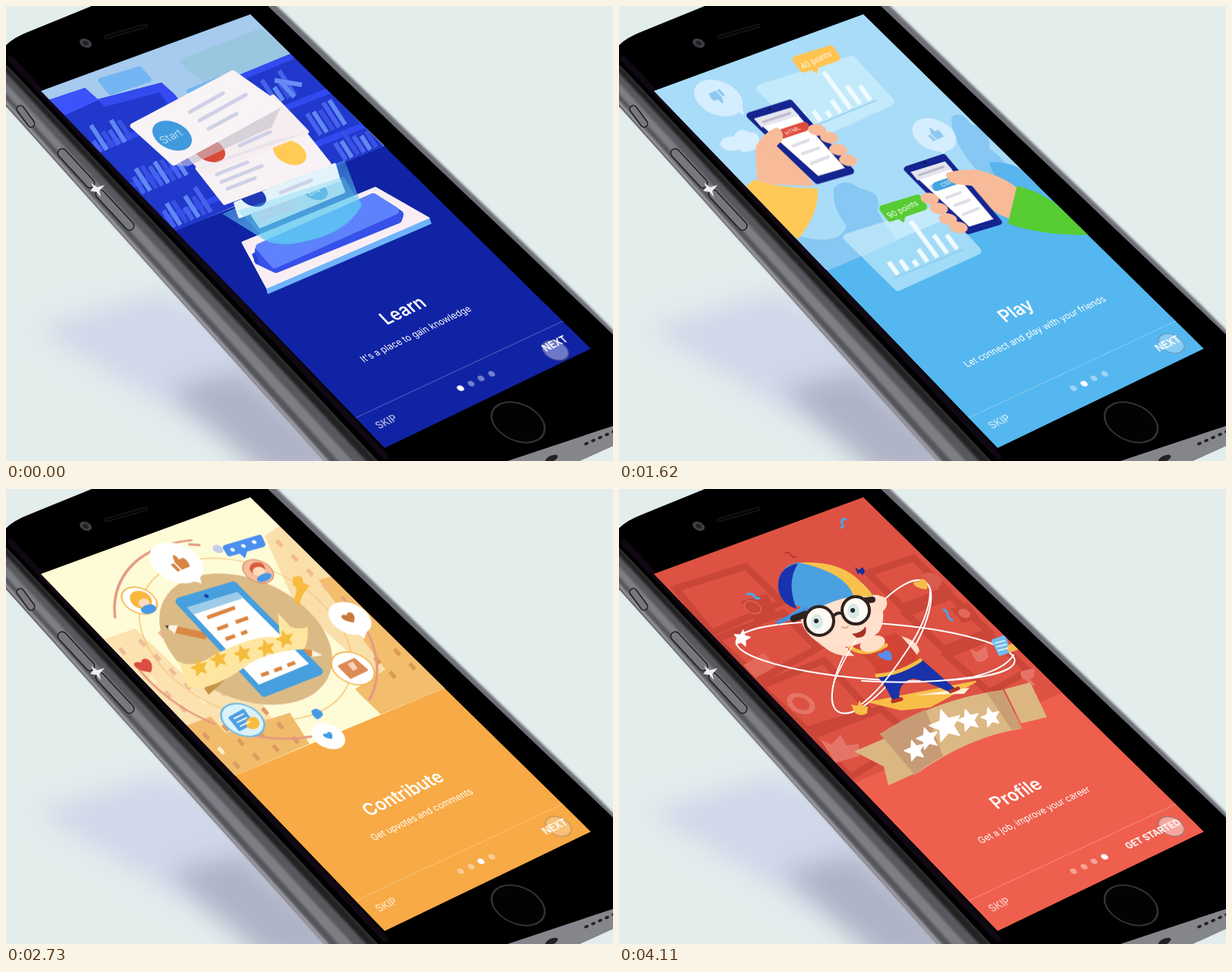
An HTML page for the animation above (4.14 s loop, 800x600 px).

```html
<!DOCTYPE html>
<html lang="en">
<head>
<meta charset="utf-8">
<title>Onboarding</title>
<style>
html, body { margin: 0; width: 100%; height: 100%; overflow: hidden; background: #e3edec; }
svg { display: block; width: 800px; height: 600px; }
text { font-family: Inter, Roboto, sans-serif; fill: #fff; }
</style>
</head>
<body>
<svg id="stage" viewBox="0 0 800 600"></svg>
<script>
const LOOP = 4140;
const SCREEN = '46,112 322,11 771,452 499,583';

// Shape helpers; "plane" maps local units onto the tilted screen
const plane = (x, y, s = 1) => `matrix(${.735 * s} ${-.32 * s} ${.68 * s} ${.69 * s} ${x} ${y})`;
const poly = (pts, fill, round = 0, more = '') =>
  `<polygon points="${pts}" fill="${fill}" stroke="${fill}" stroke-width="${round}" stroke-linejoin="round" ${more}/>`;
const line = (x, y, x2, y2, color, w = 4, cap = 'round') =>
  `<path d="M${x} ${y}L${x2} ${y2}" stroke="${color}" stroke-width="${w}" stroke-linecap="${cap}"/>`;
const path = (d, fill, more = '') => `<path d="${d}" fill="${fill}" ${more}/>`;
const curve = (d, color, w, more = '') => path(d, 'none', `stroke="${color}" stroke-width="${w}" stroke-linecap="round" ${more}`);
const oval = (x, y, rx, ry, fill, rot = 0, more = '') =>
  `<ellipse rx="${rx}" ry="${ry}" fill="${fill}" transform="translate(${x} ${y}) rotate(${rot})" ${more}/>`;
const disc = (x, y, r, fill, more = '') => `<circle r="${r}" fill="${fill}" transform="${plane(x, y)}" ${more}/>`;
const group = (id, inner, more = '') => `<g id="${id}" ${more}>${inner}</g>`;
const at = (x, y, s, inner) => `<g transform="${plane(x, y, s)}">${inner}</g>`;
const label = (x, y, size, str, anchor = 'middle', more = '') =>
  `<text transform="matrix(.725 -.349 .66 .7 ${x} ${y})" font-size="${size}" text-anchor="${anchor}" ${more}>${str}</text>`;
const heart = (x, y, s, fill) => at(x, y, s, path('M0 9C-20-4-8-16 0-7C8-16 20-4 0 9Z', fill));
const thumb = (x, y, s, fill, turn = 0) => at(x, y, s,
  path('M-11-2h5v12h-5zM-4-2L1-12Q6-12 4-4H11Q13 3 9 10H-4Z', fill, `transform="rotate(${turn})"`));
const star = (x, y, r, fill, rot = -18) => {
  const pts = [...Array(10)].map((_, i) => {
    const a = (i * 36 - 90 + rot) * Math.PI / 180, q = i % 2 ? r * .45 : r;
    return `${(x + q * Math.cos(a)).toFixed(1)},${(y + q * Math.sin(a)).toFixed(1)}`;
  });
  return poly(pts.join(' '), fill, 1.5);
};
let seed = 7;
const rand = () => (seed = (seed * 16807) % 2147483647) / 2147483647;

// Phone body
function strip(a, b, color) {
  const top = k => 76 + 52 * k, foot = k => 490 - 70 * k;
  return poly(`-2,${top(a)} -2,${top(b)} ${foot(b)},602 ${foot(a)},602`, color);
}
function body() {
  const button = (x, y, x2, y2, w) => line(x, y, x2, y2, '#1c1c20', w + 3) + line(x, y, x2, y2, '#77777d', w);
  let s = '<g filter="url(#soft)">' +
    poly('40,425 200,378 330,425 560,630 380,630', '#ccd3ea', 0, 'opacity=".8"') +
    poly('215,505 310,480 470,610 350,630', '#9a9cb0', 0, 'opacity=".6"') + '</g>';
  s += poly('330,-5 350,-5 762,391 805,434 805,470 700,400', '#6e6f78', 3, 'filter="url(#edge)"');
  s += path('M805 548L640 602H752L805 578Z', '#85858c');
  for (let i = 0; i < 5; i++) s += oval(765 + i * 9, 577 - i * 4, 3, 2, '#222', -25);
  s += oval(719, 597, 9, 4, '#222', -25);
  s += path('M-2 54L-2 130L421 602H505Z', '#3a3a3e');
  s += '<g filter="url(#edge)">' + strip(0, .2, '#202024') + strip(.2, .45, '#58585e') +
    strip(.45, .72, '#7e7e85') + strip(.72, .9, '#55555b') + strip(.9, 1, '#a0a0a6') + '</g>';
  s += path('M-2 54Q8 42 32 33L118-2H343L805 438V552L655 602H492L22 100Q2 78-2 76Z', '#000');
  s += curve('M6 70L500 594', '#150b17', 8, 'opacity=".8"');
  s += button(19, 136, 33, 155, 8) + button(74, 194, 111, 234, 10) + button(124, 248, 163, 290, 10);
  s += path('M112 233l8 6 10-3-7 8 2 8-6-7-8-1 4-5z', '#eee');
  s += disc(105, 49, 8, '#413f43') + disc(105, 49, 4, '#232126');
  s += line(132, 41, 184, 26, '#211a24', 5) + line(132, 41, 184, 26, '#050305', 3);
  s += disc(675, 549, 35, '#030303', 'stroke="#35313a" stroke-width="2.5"');
  return s;
}

// Library shelves with a stack of cards
function learnArt() {
  const books = (x, y, n) => {
    let s = '';
    for (let i = 0; i < n; i++) {
      const h = 18 + rand() * 22, c = ['#4762ec', '#6288f2', '#3a50e2'][i % 3];
      s += line(x + i * 8, y - i * 3.4, x + i * 8 - h * .55, y - i * 3.4 - h * .85, c, 6, 'butt');
    }
    return s;
  };
  const rule = (x, y, x2, y2) => line(x, y, x2, y2, '#cfd1e7', 5);
  let s = poly('40,114 325,8 500,184 222,297', '#a6cbee');
  s += poly('125,98 176,83 188,97 138,114', '#73b5f2', 7) + poly('233,73 335,33 371,63 265,101', '#99c7df', 7);
  s += poly('240,112 285,94 310,118 268,132', '#73b5f2', 5);
  s += poly('56,124 104,108 121,123 205,101 345,245 222,298', '#2038cc');
  s += poly('56,124 104,108 122,124 78,144', '#3c53fb') + poly('121,123 205,101 222,116 262,168 244,172 202,114 130,133', '#334af0');
  s += poly('300,97 378,64 498,185 370,236', '#2038cc') + line(305, 96, 378, 66, '#334af0', 8, 'butt');
  for (const [x, y, w] of [[113, 192, 110], [158, 240, 120], [200, 285, 100], [360, 138, 76], [395, 188, 80]])
    s += line(x, y, x + w, y - w * .4, '#304af0', 8, 'butt');
  s += books(125, 193, 6) + books(182, 247, 8) + books(222, 292, 7) + books(357, 128, 4) + books(415, 170, 5) + books(448, 203, 6);
  s += line(354, 98, 390, 104, '#6a8ef4', 6, 'butt') + line(360, 98, 380, 120, '#6288f2', 6, 'butt');
  s += poly('215,300 503,183 503,235 255,335', '#1023a5');
  s += poly('312,312 487,240 557,280 345,373', '#f8eef3', 3) + poly('343,373 558,280 561,287 345,380', '#6fb4fa');
  s += poly('334,322 484,253 518,275 516,281 356,346 333,335', '#3750e9', 12);
  s += poly('334,318 484,252 513,270 354,341', '#5d82fb', 10) + line(327, 328, 331, 338, '#2744d6', 5);
  let cards = poly('325,276 440,231 445,245 335,291', '#d4f0f8', 4, 'opacity=".85"') + disc(407, 243, 17, '#65b1e4') +
    label(408, 247, 11, 'End') + rule(337, 281, 382, 263) + rule(335, 274, 378, 256);
  cards += poly('302,260 433,209 439,230 308,278', '#e2f3fb', 4) + disc(325, 251, 18, '#2039b6') + rule(362, 246, 402, 230);
  cards += poly('252,214 391,164 426,208 288,260', '#f8f2f4', 5) + disc(374, 193, 22, '#ffcb55') +
    rule(278, 222, 318, 206) + rule(284, 232, 337, 211) + rule(292, 241, 328, 227);
  cards += poly('240,197 352,119 397,166 262,221', '#f6edf0', 5) + disc(268, 190, 21, '#d94a39') + rule(308, 184, 348, 166);
  cards += poly('252,216 397,167 350,178 275,206', '#d9d2dd', 0, 'opacity=".45"') + poly('222,210 363,132 350,160 240,211', '#c7c0cc', 0, 'opacity=".6"');
  cards += poly('167,158 299,88 360,131 221,207', '#f8f3f5', 7) + disc(219, 171, 26, '#3f9ade') +
    label(221, 176, 16, 'Start', 'middle', 'fill-opacity=".65"') + rule(242, 140, 286, 115) + rule(255, 151, 316, 117) + rule(267, 162, 304, 142);
  s += path('M285 274L446 203L469 263Q450 298 400 309Q360 320 340 308Z', 'url(#beam)');
  return s + group('cards', cards) + path('M305 270L445 225L468 264Q440 302 385 311Q355 314 340 305Z', '#62d2ef', 'opacity=".3"');
}

// Two hands playing against each other
function playArt() {
  const chart = (tag, str) => {
    let s = poly('303,304 424,266 475,322 370,370', '#d6f4fc', 10, 'opacity=".6"') + line(365, 358, 456, 320, '#8fcbee', 1.5);
    [22, 18, 10, 22, 64, 32, 25].forEach((h, i) => {
      const x = 370 + i * 13, y = 353 - i * 5.6;
      s += line(x, y, x - h * .55, y - h * .75, '#f0fbff', 6, 'butt');
    });
    return s + poly('350,266 396,252 404,264 360,279', tag, 9) + poly('368,278 380,275 378,285', tag) + label(379, 270, 12, str);
  };
  const handset = (pill, str) => poly('4,1 52,-15 125,71 85,83', '#15248f', 8) +
    poly('9,5 54,-9 118,67 86,77', '#fff') + poly('9,5 54,-9 63,1 18,16', '#e5e5ef') +
    line(20, 9, 52, -2, '#babacb', 3) + line(35, 24, 57, 15, '#dedee8') + line(56, 39, 74, 32, '#dedee8') +
    line(67, 49, 86, 42, '#dedee8') + line(78, 61, 98, 53, '#dedee8') + disc(28, -7, 2, '#0a155f') +
    line(43, 24, 69, 15, pill, 12) + label(57, 22, 8, str);
  const fingers = pts => pts.map(([x, y]) => oval(x, y, 12, 7.5, '#f8bb99', 8)).join('');
  let s = poly('40,114 325,8 548,232 272,348', '#a9dcf9');
  s += path('M283 240Q298 225 318 241Q349 245 340 270L366 310L275 349L225 300Q290 320 300 290Q280 265 283 240Z', '#86c8f3');
  s += path('M438 147Q452 136 463 156Q490 160 488 188Q514 205 530 240L440 278L470 215Q438 178 438 147Z', '#86c8f3');
  s += path('M488 206Q525 203 550 233L520 246Q492 228 488 206Z', '#58b5ee');
  const a = path('M131 184q2-13 18-11q7-14 20-6q14-1 14 12q8 8-7 11q-13 6-20 0q-16 5-25-6z', '#d7efff') +
    `<g transform="translate(-119 -195)">${chart('#ffc34f', '40 points')}</g>` +
    disc(129, 122, 32, '#d5eeff') + poly('150,137 160,131 163,145', '#d5eeff') + thumb(129, 120, .95, '#8fc8ed', 180) +
    path('M178 190Q181 174 207 162L255 238L180 235Z', '#f8bb99') +
    `<g transform="translate(166 144) scale(1.1 1.05)">${handset('#df4c3d', 'HTML')}</g>` +
    path('M178 186Q190 166 206 161Q217 166 213 178L203 188L210 200Z', '#f8bb99') + fingers([[259, 164], [275, 174], [287, 190], [300, 204]]) +
    path('M176 230Q215 242 260 241Q262 275 234 308L150 250Z', '#ffc957');
  const b = chart('#57cc33', '90 points') + disc(418, 169, 29, '#d5eeff') + poly('425,188 438,183 429,196', '#d5eeff') + thumb(418, 168, .9, '#8fc8ed') +
    path('M435 222L473 215Q505 226 530 241L519 280Q486 270 470 238Z', '#f8bb99') +
    `<g transform="translate(378 213)">${handset('#46a4e0', 'CSS')}</g>` +
    path('M434 219Q453 214 475 215Q514 225 531 243L518 278Q492 263 476 237L448 234Q432 230 434 219Z', '#f8bb99') +
    fingers([[412, 253], [424, 266], [436, 280], [450, 291]]) + path('M527 236Q575 247 625 301Q560 302 515 286Z', '#57cc33');
  return s + group('handA', a) + group('handB', b);
}

// Rotating wheel of contributions
function wheel() {
  let s = disc(316, 198, 138, 'none', 'stroke="#f6bd68" stroke-width="1.3"') + disc(316, 198, 112, '#dbba86');
  s += disc(316, 198, 170, 'none', 'stroke="#e59a80" stroke-width="3.5" stroke-linecap="round" stroke-dasharray="185 120 75 55 120 90 210 213" transform-origin="0 0"');
  s += line(222, 185, 265, 194, '#d98945', 9, 'butt') + poly('211,180 228,180 224,191', '#fff5e0') + poly('211,180 216,180 215,185', '#5a4030');
  s += line(385, 214, 405, 217, '#d98945', 8, 'butt') + poly('402,212 416,219 402,221', '#fff5e0');
  s += poly('230,149 300,128 411,240 340,268', '#479fdd', 10) + poly('240,157 305,137 398,230 333,257', '#fff') + poly('240,157 305,137 312,145 248,166', '#9dcbea');
  s += disc(265, 142, 3, '#1738a0');
  for (const [x, y, w] of [[266, 170, 36], [279, 185, 14], [303, 176, 16], [290, 198, 12], [310, 191, 8], [336, 245, 10], [353, 239, 10], [370, 232, 10]])
    s += line(x, y, x + w, y - w * .36, '#dc8540', 5, 'butt');
  s += path('M262 262L285 242L290 250L268 270Z', '#c79443') + path('M358 164L374 182Q390 187 396 181Q398 203 391 211Q350 213 322 229Q270 268 241 260L234 240L228 226Q247 238 276 218Q330 190 360 196Z', '#ffe6a0');
  [[256, 235], [281, 224], [312, 217], [343, 210], [367, 198]].forEach(([x, y]) => s += star(x, y, 11, '#f5bd3c'));
  s += path('M377 118Q392 112 390 124L399 129Q386 141 386 156L378 147Q386 130 377 128Z', '#f8bb40');
  s += disc(226, 99, 35, '#fff') + poly('240,120 255,112 259,126', '#fff') + thumb(229, 99, 1.1, '#d78540');
  s += disc(178, 148, 23, '#fff', 'stroke="#f3b448" stroke-width="2"') + oval(180, 147, 15, 11, '#f8b83e', 25) + oval(184, 151, 7, 6, '#ffdcbd') + oval(190, 159, 10, 6, '#4699e8', -10);
  s += disc(332, 110, 20, '#f5bd9a', 'stroke="#dd906c" stroke-width="1.5"') + oval(331, 106, 10, 8, '#dc5b40') + oval(333, 110, 8, 6, '#ffdcbd') + oval(340, 118, 10, 5, '#4699e8', -20);
  s += disc(280, 81, 7, '#c5cee8') + poly('290,79 334,66 338,75 295,87', '#4a90ee', 7) + poly('307,86 319,81 315,93', '#4a90ee');
  for (const i of [0, 1, 2]) s += disc(299 + i * 14, 82 - i * 5, 3, '#fff');
  s += disc(451, 171, 28, '#fff') + poly('459,188 475,184 469,198', '#fff') + heart(451, 171, .85, '#c9773b');
  s += disc(455, 236, 28, '#fff', 'stroke="#f3b448" stroke-width="2"') + poly('437,233 457,224 473,238 452,248', '#dd8a55', 3) + poly('448,230 455,227 461,236 455,239', '#f7d3b4');
  s += disc(312, 303, 28, '#dcf2fa', 'stroke="#66b7ea" stroke-width="2.5"') + poly('295,300 313,290 325,307 308,316', '#4e9fe2', 3) + oval(325, 307, 9, 8, '#f8bc40');
  for (const i of [0, 1, 2]) s += line(301 + i * 4, 301 + i * 5, 313 + i * 4, 295 + i * 5, '#fff', 1.8);
  s += disc(423, 324, 22, '#fff') + heart(424, 324, .6, '#459ce3') + path('M401 291Q407 285 414 292Q420 297 409 302Q402 299 401 291Z', '#459ce3');
  return s + heart(186, 234, 1.15, '#dc4d43') + line(243, 75, 256, 76, '#e59a80', 3);
}
function contributeArt() {
  let s = poly('40,114 325,8 582,261 302,378', '#fefbd7');
  s += poly('130,198 170,184 245,255 305,235 380,345 302,378', '#fbe2b0');
  s += poly('341,62 360,49 582,261 494,297 465,270 478,240 380,150', '#fbdfaa');
  s += poly('412,120 430,115 582,261 494,297 460,264 500,238', '#f2bd6c') + poly('235,313 270,300 290,322 374,295 400,336 302,378', '#f1bb6c');
  const panes = (x, y, cols, rows, c) => {
    for (let j = 0; j < rows; j++) for (let i = 0; i < cols; i++) {
      const px = x + i * 26 + j * 20, py = y - i * 11 + j * 19;
      s += line(px, py, px + 7, py + 8, rand() < .2 ? '#fdeec6' : c, 5, 'butt');
    }
  };
  panes(150, 210, 3, 5, '#f0bc9a'); panes(260, 322, 4, 3, '#dd9b61'); panes(357, 68, 2, 4, '#f0bc8a'); panes(486, 222, 2, 2, '#d99a55');
  return s + `<g transform="${plane(316, 198)}"><g id="wheel"><g transform="matrix(.967 .449 -.953 1.03 -116.9 -345.8)">${wheel()}</g></g></g>`;
}

// Trophy shelf and champion
function profileArt() {
  let s = poly('40,114 325,8 588,267 310,388', '#dd5243');
  const frame = (pts, fill = 'none') => `<polygon points="${pts}" fill="${fill}" stroke="#c94638" stroke-width="9"/>`;
  s += frame('75,131 167,102 215,149 122,190') + frame('128,198 216,163 262,210 185,252') + frame('186,260 270,226 330,292 248,318') + frame('253,326 345,290 388,328 305,380');
  s += frame('328,111 388,91 432,133 374,156') + frame('378,164 437,141 487,188 428,211') + frame('432,219 491,195 540,240 488,268');
  s += poly('160,148 196,138 206,162 180,174', '#c94638') + disc(176, 156, 11, 'none', 'stroke="#e2685a" stroke-width="1.5"');
  s += poly('164,232 191,216 206,234 180,249', '#e2685a') + disc(240, 283, 15, 'none', 'stroke="#e57467" stroke-width="7"');
  s += poly('266,331 280,337 292,324 300,338 316,336 317,352 285,361', '#e57467');
  s += poly('437,158 460,150 475,169 453,177', '#c94638') + disc(455, 164, 8, '#e2685a') + path('M462 211l10 4 12-8 3 14q-8 11-17 5z', '#e57467') + path('M529 241l18-5q3 12-5 15l7 7-8 3-4-9q-8-1-8-11z', '#e57467') + disc(412, 120, 13, '#d75d4e');
  let orbit = oval(338, 214, 184, 37, 'none', 4, 'stroke="#fff" stroke-width="2"') + oval(346, 208, 103, 37, 'none', -56, 'stroke="#fff" stroke-width="2"');
  let c = poly('331,281 470,254 410,287 372,291', '#f9be48', 2) + poly('390,272 462,262 455,270', '#fff0d5');
  c += path('M339 246Q370 242 398 224Q420 243 445 265L436 268Q404 253 388 250Q366 255 370 279L361 280Q351 257 339 246Z', '#1932a8') +
    line(361, 280, 372, 277, '#b83226', 5) + line(437, 267, 447, 263, '#b83226', 5);
  c += path('M297 207Q279 211 261 202L270 208Q285 222 310 220ZM372 194Q394 200 396 214L386 227L379 222L387 212Z', '#ffdec8');
  c += path('M301 208L365 190Q386 206 397 226Q370 246 340 246Q338 226 301 208Z', '#d24535') + curve('M340 246Q370 244 397 226M303 207Q322 224 352 206', '#f7bd46', 5);
  c += oval(334, 204, 17, 10, '#ffdec8', -18) + heart(353, 221, .9, '#5a8cf2');
  c += path('M238 164Q242 196 275 208Q314 213 342 189Q354 172 343 140L285 137Z', '#ffe1ce') + oval(344, 152, 9, 11, '#ffdec8', 20);
  c += path('M210 176Q225 165 240 156Q208 144 211 119Q218 96 242 97Q289 97 312 117Q331 132 335 142Q295 136 247 166Q228 174 210 176Z', '#4ba1df');
  c += path('M236 98Q207 104 210 132Q214 152 234 158Q220 123 236 98Z', '#1933b0') + path('M238 97Q292 94 318 122Q331 133 335 142L309 141Q300 111 238 97Z', '#f9c14b') + line(210, 176, 247, 158, '#3d92e0', 5);
  const lens = (x, y, r) => `<circle cx="${x}" cy="${y}" r="${r}" fill="#fffaf4" stroke="#30221f" stroke-width="4"/>` + oval(x - 3, y + 1, 8, 10, '#d7e9e6') + `<circle cx="${x - 4}" cy="${y}" r="3" fill="#2b2525"/>`;
  c += line(230, 171, 246, 165, '#30221f', 9) + line(324, 147, 334, 146, '#30221f', 8) + lens(264, 174, 19) + lens(312, 160, 18) + curve('M282 168Q289 161 295 165', '#30221f', 4);
  c += path('M307 191Q320 190 325 181Q328 197 313 196Z', '#a93127') + curve('M294 182Q299 185 302 181', '#dfa48e', 2);
  c += curve('M283 255Q300 217 313 199', '#fff', 1.6) + curve('M410 135Q410 170 374 221Q344 266 318 285', '#fff', 2) + curve('M320 253Q400 258 466 248Q508 238 520 219', '#fff', 2);
  c += star(162, 197, 11, '#fff', 10) + path('M306 284l8 2 3-7 4 7 7 1-1 9q-10 5-17-2z', '#f8bd48');
  c += poly('493,200 508,195 514,214 502,218', '#72bcec', 4) + line(516, 210, 522, 208, '#f6ba55', 10);
  for (const i of [0, 1, 2]) c += line(496 + i * 2, 203 + i * 5, 508 + i * 2, 200 + i * 5, '#eaf6fc', 1.8);
  const confetti = curve('M299 40q-7-1-5 5q3 5-1 6', '#4aa6ec', 3) + curve('M169 139q6-2 9 2q2 4 7 3', '#4aa6ec', 3) + curve('M428 159q5 2 5 7q1 5 6 7', '#4aa6ec', 3) +
    path('M311 103l5 4 5-4 3 5-3 6-4-4-2 3z', '#182b9c') + curve('M219 84q5-2 7 3q3 3 7 3', '#b83a36', 2) + heart(400, 127, .9, '#f8bd48');
  const ribbon = poly('310,346 350,329 390,375 355,391 349,366', '#dcb681') + poly('508,264 542,255 564,301 530,309', '#dcb681') +
    path('M344 323Q420 276 506 265L531 316Q462 326 390 377Z', '#dcb884') + path('M344 323Q374 303 404 291L427 352Q408 362 390 377Z', '#c69b75') + poly('485,269 506,265 531,316 517,317', '#c99e75') +
    star(390, 345, 14, '#fff') + star(407, 329, 15, '#fff') + star(431, 312, 22, '#fff') + star(461, 305, 15, '#fff') + star(490, 301, 13, '#fff');
  return s + group('hero', orbit + c) + group('ribbon', ribbon) + group('confetti', confetti);
}

const pages = [
  ['Learn', "It's a place to gain knowledge", learnArt, -7],
  ['Play', 'Let connect and play with your friends', playArt, 1],
  ['Contribute', 'Get upvotes and comments', contributeArt, 1],
  ['Profile', 'Get a job, improve your career', profileArt, 0]
];
const spots = [[599, 504], [613, 498], [626, 491], [640, 485]];

stage.innerHTML = `<defs>
  <clipPath id="screen"><polygon points="${SCREEN}"/></clipPath>
  <filter id="soft" x="-30%" y="-30%" width="160%" height="160%"><feGaussianBlur stdDeviation="16"/></filter>
  <filter id="edge"><feGaussianBlur stdDeviation="1.5"/></filter>
  <linearGradient id="beam" x1="0" y1="0" x2=".4" y2="1"><stop stop-color="#60c6ee" stop-opacity=".2"/><stop offset="1" stop-color="#5cc9f4" stop-opacity=".75"/></linearGradient>
</defs>` + body() + `<g clip-path="url(#screen)"><polygon id="ground" points="${SCREEN}" fill="#1023a5"/>` +
  pages.map((p, i) => group('art' + i, p[2]())).join('') +
  pages.map((p, i) => group('copy' + i,
    label(529, 408, 27, p[0], 'middle', 'font-weight="600"') + label(550 + p[3], 433 - p[3] * .4, 14, p[1]))).join('') +
  line(461, 543, 735, 415, 'rgba(255,255,255,.25)', 1.2) +
  spots.map(([x, y]) => disc(x, y, 4.6, '#fff', 'opacity=".42"')).join('') +
  spots.map(([x, y], i) => group('dot' + i, disc(x, y, 4.6, '#fff'))).join('') +
  label(492, 558, 15.5, 'SKIP', 'start', 'font-weight="600" opacity=".62"') +
  group('tap', disc(728, 445, 17, '#fff', 'fill-opacity=".6" stroke="#7b7b86" stroke-width="1.5"')) +
  group('next', label(742, 442, 15, 'NEXT', 'end', 'font-weight="700"')) +
  group('start', label(742, 442, 14, 'GET STARTED', 'end', 'font-weight="700"')) + '</g>';

// Motion: each step is [ms, value, easing]
const OUT = 'cubic-bezier(.1,.6,.3,1)', EASE = 'ease-in-out';
function move(id, prop, steps) {
  const all = [...steps];
  if (all[0][0] > 0) all.unshift([0, all[0][1]]);
  const last = all[all.length - 1];
  if (last[0] < LOOP) all.push([LOOP, last[1]]);
  document.getElementById(id).animate(
    all.map(([t, v, easing = 'linear']) => ({ offset: t / LOOP, [prop]: v, easing })),
    { duration: LOOP, iterations: Infinity });
}
const shift = (x, y) => `translate(${x}px,${y}px)`;
const swaps = [[150, 620], [1710, 2160], [2850, 3300]];

pages.forEach((_, i) => {
  const enter = swaps[i - 1], leave = swaps[i], slide = [], fade = [], art = [], dot = [];
  if (enter) {
    const [a, b] = enter, mid = (a + b) / 2;
    art.push([a, 0, EASE], [b, 1]);
    fade.push([mid, 0], [b, 1]);
    slide.push([a, shift(130, -62), OUT], [b, shift(0, 0)]);
    dot.push([mid - 60, 0], [mid + 60, 1]);
  }
  if (leave) {
    const [a, b] = leave, mid = (a + b) / 2;
    art.push([a, 1, EASE], [b, 0]);
    fade.push([a, 1], [mid, 0]);
    slide.push([a, shift(0, 0), EASE], [b, shift(-130, 62)]);
    dot.push([mid - 60, 1], [mid + 60, 0]);
  }
  move('art' + i, 'opacity', art);
  move('copy' + i, 'opacity', fade);
  move('copy' + i, 'transform', slide);
  move('dot' + i, 'opacity', dot);
});
move('ground', 'fill', [[150, '#1023a5', EASE], [620, '#43a8ec'], [930, '#43a8ec'], [1620, '#55b7ef'], [1710, '#55b7ef', EASE],
  [2160, '#f0a744'], [2250, '#f1a744'], [2730, '#f7aa45'], [2850, '#f7aa45', EASE], [3300, '#e95d48'], [3570, '#eb5e49'], [4110, '#ef5f4d']]);
move('cards', 'transform', [[0, shift(0, 0)], [620, shift(-4, -4)]]);
move('handA', 'transform', [[150, shift(-70, 26), OUT], [930, shift(0, 0)], [1620, shift(2, -.7)], [2160, shift(-30, 11)]]);
move('handB', 'transform', [[150, shift(70, -28), OUT], [930, shift(0, 0)], [1620, shift(-2.5, 1)], [2160, shift(30, -12)]]);
move('wheel', 'transform', [[1710, 'rotate(21deg)'], [2250, 'rotate(9.7deg)'], [2730, 'rotate(0deg)'], [3300, 'rotate(-11deg)']]);
move('hero', 'transform', [[2850, shift(40, -12), OUT], [3570, shift(3, 0)], [4110, shift(0, 0)]]);
move('ribbon', 'transform', [[2850, shift(14, 10), OUT], [3570, shift(1, 0)], [4110, shift(0, 0)]]);
move('confetti', 'transform', [[2850, shift(-20, -22), OUT], [3570, shift(-2, -2)], [4110, shift(0, 0)]]);
move('tap', 'opacity', [[0, .65], [120, .8], [300, 0], [1530, 0], [1620, .5], [1710, .8], [1860, 0],
  [2640, 0], [2730, .45], [2850, .8], [3000, 0], [3480, 0], [3570, .45], [4110, .75]]);
move('tap', 'transform', [[0, shift(-4, 9)], [300, shift(-4, 9)], [1530, shift(0, 0)]]);
move('next', 'opacity', [[3000, 1], [3150, 0]]);
move('start', 'opacity', [[3050, 0], [3250, 1]]);
</script>
</body>
</html>
```
